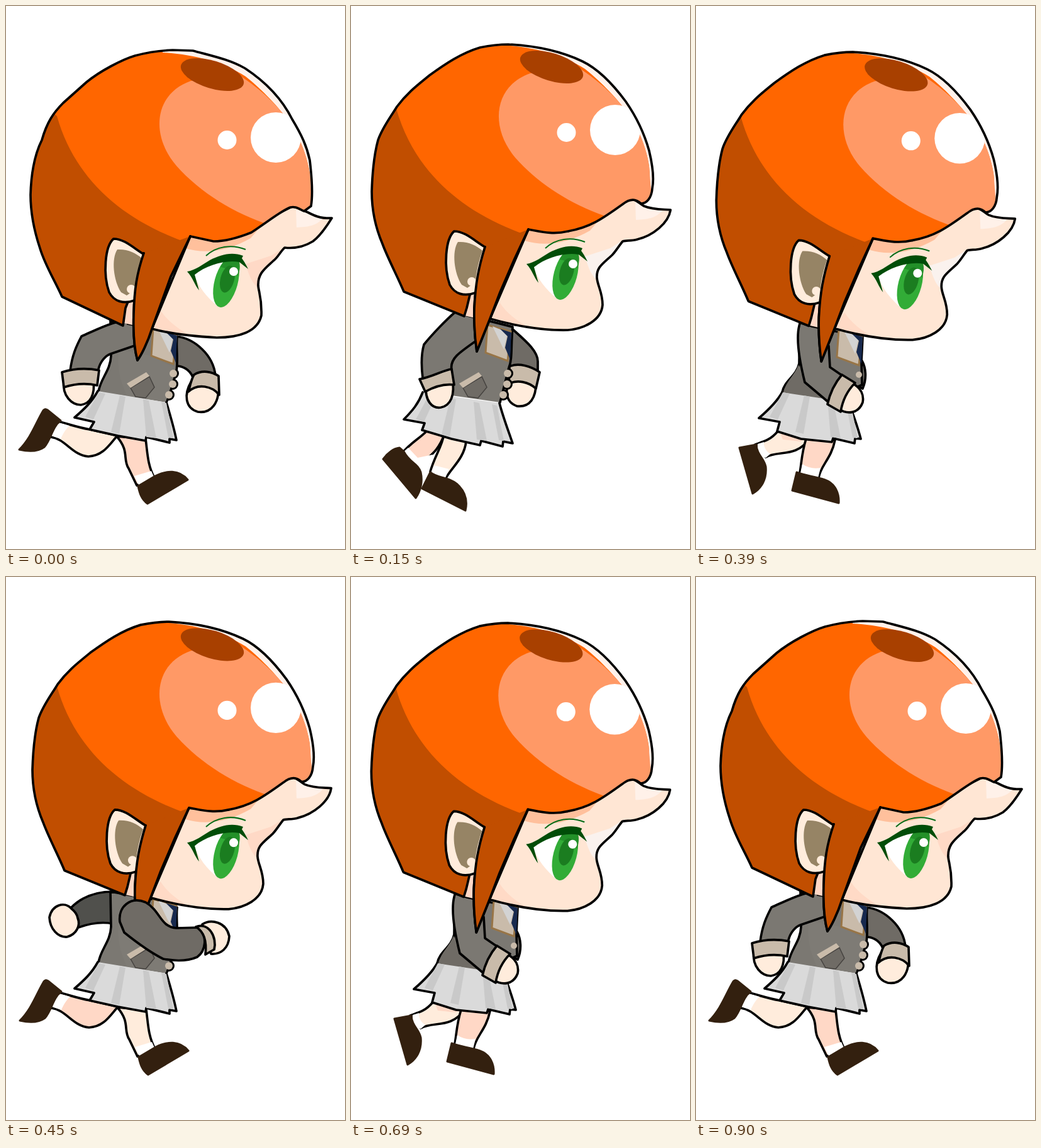
Recreate the animation shown at these times as an HTML page. Size 539x863 px, loop 1050 ms.

```html
<!DOCTYPE html>
<html lang="en">
<head>
<meta charset="utf-8">
<title>Running girl</title>
<style>
html, body { margin: 0; width: 100%; height: 100%; overflow: hidden; background: #fff; }
svg { display: block; width: 100%; height: 100%; }
.ink { stroke: #000; stroke-width: 3.7; stroke-linejoin: round; stroke-linecap: round; }
.line { fill: none; }
.skin { fill: #ffecdc; }
.rose { fill: #ffd8c6; }
.coat { fill: #7b7872; }
.shade { fill: #6f6b65; }
.tan { fill: #c9bbaa; }
.skirt { fill: #dadada; }
.pleat { fill: #c9c9c9; }
.sock { fill: #fff; }
.shoe { fill: #33200f; stroke: #33200f; stroke-width: 3; stroke-linejoin: round; }
.hair { fill: #c14e00; }
.pose { visibility: hidden; animation: 1050ms step-end infinite; }
.stride { animation-name: stride; }
.lift { animation-name: lift; }
.pass { animation-name: pass; }
.reach { animation-name: reach; }
.stride, .reach { --cheek: #ffd9c6; }
.lift, .pass { --cheek: #faf2ee; }
@keyframes stride { 0%, 85.7143% { visibility: visible } 14.2857%, 100% { visibility: hidden } }
@keyframes lift { 0%, 28.5714%, 85.7143%, 100% { visibility: hidden } 14.2857%, 71.4286% { visibility: visible } }
@keyframes pass { 0%, 42.8571%, 71.4286%, 100% { visibility: hidden } 28.5714%, 57.1429% { visibility: visible } }
@keyframes reach { 0%, 57.1429%, 100% { visibility: hidden } 42.8571% { visibility: visible } }
</style>
</head>
<body>
<svg viewBox="0 0 539 863">
<defs>
  <!-- head outlines -->
  <path id="skull" d="M84 454C74 430 58 400 50 378C38 350 33 325 33 295C34 262 37 235 43 213C50 193 62 178 73 160C90 137 108 124 125 110C150 92 175 75 205 66C225 62 240 61 250 61C290 63 330 70 368 88C395 101 417 125 437 152C455 178 467 205 474 230C480 255 482 275 479 290C478 305 470 314 461 314C452 305 442 307 432 315C400 338 380 352 345 358C320 364 300 358 282 355L260 402 237 455 221 497 200 549C198 535 195 515 196 480C198 440 203 415 213 383L190 455 184 480 180 493Z"/>
  <path id="skullRun" d="M89 462C78 437 62 412 54 385C44 355 39 330 39 300C40 265 46 235 57 213C65 185 75 170 91 154L128 121C150 103 185 85 205 79C220 75 240 71 265 70L297 71C330 80 355 85 380 99C415 122 440 150 455 180C470 205 478 222 483 245C486 270 488 300 485 318L474 326C465 322 460 318 452 320C440 324 420 340 390 360C370 368 350 374 330 374L293 366 262 430 232 513C225 535 215 555 209 563C204 545 202 520 203 490C204 450 208 425 219 393L196 465 190 480 186 508Z"/>
  <clipPath id="skullClip"><use href="#skull"/></clipPath>
  <clipPath id="skullRunClip"><use href="#skullRun"/></clipPath>
  <path id="face" d="M221 497C260 508 305 516 345 515C370 513 398 500 400 475C400 455 392 445 391 432C390 415 400 410 415 396C421 390 426 381 432 374C438 372 445 374 455 371C480 365 505 345 508 324C495 323 480 324 466 318C458 314 452 305 443 308L345 358 282 355Z"/>
  <path id="faceRun" d="M232 513C265 522 300 525 335 527C370 527 400 518 406 492C407 465 402 455 401 445C400 425 412 417 425 405C432 400 435 392 443 384C460 386 475 382 488 374C500 365 510 350 518 337C505 338 495 336 480 328C470 324 458 316 452 320L354 370 293 366Z"/>
  <clipPath id="faceClip"><use href="#face"/></clipPath>
  <clipPath id="faceRunClip"><use href="#faceRun"/></clipPath>

  <g id="faceTones">
    <path d="M200 300H520V560H200Z" fill="#ffe6d4"/>
    <path d="M265 350L276 373C308 383 345 377 380 357L420 310Z" fill="#ffc09c"/>
    <path d="M215 500L237 472C250 492 270 505 300 520Z" fill="#ffdac6"/>
    <path d="M372 398L412 385 436 370 425 395 390 434C382 428 377 415 372 398Z" fill="var(--cheek)"/>
    <path d="M452 312L453 340C470 339 485 338 496 324L470 315Z" fill="#fff1e9"/>
  </g>
  <g id="hairTones">
    <path d="M0 0H539V600H0Z" fill="#fff1ea"/>
    <path d="M0 0H240V62C290 65 335 77 372 100C400 122 425 150 440 170C455 190 470 225 474 255C476 275 474 300 470 325L400 600H0Z" fill="#f60"/>
    <path class="hair" d="M72 163C100 262 175 328 279 364L310 420 200 580 0 580V100Z"/>
    <path d="M285 107C225 128 221 195 262 242C300 285 355 318 410 336L480 330 474 255C470 225 455 190 440 170C425 150 400 122 360 97Z" fill="#f96"/>
    <ellipse cx="319" cy="97" rx="52" ry="22" transform="rotate(17 319 97)" fill="#a84000"/>
    <circle cx="420" cy="197" r="40" fill="#fff"/>
    <circle cx="342.500" cy="201" r="15" fill="#fff"/>
  </g>
  <g id="eye">
    <path d="M289 411C305 398 322 391 345 388L326 464C312 452 296 435 289 411Z" fill="#fff"/>
    <ellipse cx="341" cy="427" rx="18.500" ry="41" transform="rotate(15 341 427)" fill="#32ac37"/>
    <path d="M332 403C338 388 352 384 361 392C364 400 363 408 360 417C351 408 342 405 332 403Z" fill="#239029"/>
    <ellipse cx="343" cy="422" rx="11" ry="22" transform="rotate(15 343 422)" fill="#1b7d20"/>
    <path d="M279 410C292 408 303 399 315 392C332 383 350 378 368 385L366 389C371 396 373 400 376 406L362 395C340 391 310 400 291 415L298 440C290 430 289 421 279 410Z" fill="#004d08"/>
    <path d="M309 385C325 370 350 366 372 375" class="line" stroke="#006b16" stroke-width="2"/>
    <circle cx="353" cy="410" r="7" fill="#fff"/>
  </g>
  <g id="ear">
    <path class="ink skin" d="M213 383C197 374 182 358 164 358C150 370 147 415 157 443C165 458 180 462 197 456L204 450Z"/>
    <path d="M170 375C186 374 199 380 209 389C202 409 199 425 198 439L185 448 176 443C164 425 160 390 170 375Z" fill="#968465"/>
    <circle cx="192" cy="438" r="7" class="skin"/>
  </g>
  <path id="neck" class="rose" d="M186 450H215V500L180 492Z"/>
  <g id="head">
    <use href="#neck"/>
    <g clip-path="url(#faceClip)"><use href="#faceTones"/></g>
    <use href="#face" class="ink line"/>
    <use href="#eye"/>
    <g clip-path="url(#skullClip)"><use href="#hairTones"/></g>
    <use href="#skull" class="ink line"/>
    <use href="#ear"/>
    <path class="ink hair" d="M213 383C203 415 198 440 196 480C195 515 198 535 200 549L221 497 237 455 260 402 282 355"/>
  </g>
  <g id="headRun">
    <g clip-path="url(#faceRunClip)"><use href="#faceTones" x="9" y="12"/></g>
    <use href="#neck" x="8" y="12"/>
    <use href="#faceRun" class="ink line"/>
    <use href="#eye" x="9" y="12"/>
    <g clip-path="url(#skullRunClip)"><use href="#hairTones" x="9" y="12"/></g>
    <use href="#skullRun" class="ink line"/>
    <use href="#ear" x="7" y="12"/>
    <path class="ink hair" d="M219 393C208 425 204 450 203 490C202 520 204 545 209 563C215 555 225 535 232 513L262 430 293 366"/>
  </g>

  <!-- uniform details -->
  <g id="buttons" class="tan" stroke-width="6">
    <circle cx="266" cy="584" r="6"/><circle cx="265" cy="601" r="6"/><circle cx="259" cy="618" r="6"/>
  </g>
  <g id="lapel">
    <path d="M234 512L231 556 266 569 271 522Z" class="tan" stroke="#987547" stroke-width="3"/>
    <path d="M242 514L260 551 266 524Z" fill="#d3d3d3"/>
    <path d="M254 518L272 524 270 567 262 548 266 530Z" fill="#17294e"/>
  </g>
  <g id="pocket">
    <path class="shade" d="M198 607L206 621 222 623 236 606 228 589Z" stroke="#45423f" stroke-width="1.500"/>
    <path class="tan" d="M192 600L223 582 228 588 198 607Z"/>
  </g>
  <g id="pleats" class="pleat">
    <path d="M147 614L158 616 139 657 126 653Z"/>
    <path d="M181 619L190 621 180 680 167 677Z"/>
    <path d="M218 625L227 627 239 687 223 685Z"/>
    <path d="M247 629L255 631 266 687 258 686Z"/>
  </g>

  <!-- body shared by both wide strides -->
  <g id="strideLegs">
    <path class="ink" fill="var(--back)" d="M133 673C115 670 98 664 82 660L71 685C95 688 105 714 131 716C155 715 165 696 177 683Z"/>
    <path class="sock" d="M83 662L101 667C95 672 90 681 87 688L72 683Z"/>
    <path class="shoe" d="M59 643Q62 639 66 642L87 659C73 669 72 689 61 701C50 709 34 708 21 705C40 686 47 663 59 643Z"/>
    <path class="ink" fill="var(--front)" d="M176 684C197 708 185 720 195 735L208 762 236 750C225 730 225 710 222 688Z"/>
    <path class="sock" d="M204 747L231 739 236 750 211 761Z"/>
    <path class="shoe" d="M210 763L237 747C255 738 275 736 289 753L225 791C215 784 212 773 210 763Z"/>
  </g>
  <g id="strideTorso">
    <use href="#buttons" stroke="#000"/>
    <path class="ink coat" d="M147 613C150 592 166 580 167 556L166 500 232 512 272 525C270 545 274 560 271 580C266 597 262 615 255 630"/>
    <path d="M179 546C176 575 182 600 193 620L254 629 269 575 230 556Z" fill="#7e7b75"/>
    <use href="#lapel"/><use href="#buttons"/><use href="#pocket"/>
    <path class="ink skirt" d="M146 612C136 630 124 641 109 654L140 661 133 673 178 683 222 691 223 685 260 694 260 688 271 690C267 670 261 650 255 630"/>
    <use href="#pleats"/>
  </g>
</defs>

<g class="pose stride">
  <use href="#strideLegs" style="--back:#ffecdc;--front:#ffd8c6"/>
  <path class="ink shade" d="M270 525C300 528 330 555 333 588L297 590C292 577 280 572 270 572Z"/>
  <path class="ink skin" d="M295 596C282 618 285 639 305 645C325 648 342 632 337 596Z"/>
  <path class="ink tan" d="M290 613C293 602 295 592 299 586C312 578 327 581 338 588L339 618C328 604 305 599 290 613Z"/>
  <use href="#strideTorso"/>
  <path class="coat" d="M190 500C165 503 145 514 120 525C112 540 105 555 102 580L147 577C150 565 158 556 166 553L205 540Z"/>
  <path class="ink line" d="M190 500C165 503 145 514 120 525C112 540 105 555 102 580M147 577C150 565 158 556 166 553L204 540"/>
  <path class="ink skin" d="M92 596C89 620 105 634 119 634C134 632 142 618 139 594Z"/>
  <path class="ink tan" d="M89 582C108 576 128 575 148 579L145 603C128 599 110 600 92 606Z"/>
  <use href="#headRun"/>
</g>

<g class="pose lift">
  <path class="ink rose" d="M120 676C108 688 94 695 82 710L108 735C116 718 136 715 148 682Z"/>
  <path class="sock" d="M91 702L106 718 130 713 117 750 105 745 82 710Z"/>
  <path class="shoe" d="M51 720C58 710 68 703 77 702L84 708C94 727 106 726 111 741C114 755 111 770 103 782Z"/>
  <path class="ink skin" d="M148 680C145 700 133 715 126 740L150 752C158 735 180 720 183 692Z"/>
  <path class="sock" d="M132 730L156 736 149 752 127 742Z"/>
  <path class="shoe" d="M113 767L126 741C140 752 153 747 169 760C181 771 186 785 182 802Z"/>
  <path class="ink shade" d="M255 512C275 530 298 548 297 566V582L252 576Z"/>
  <path class="ink skin" d="M256 586C242 610 246 630 264 636C283 638 296 625 294 592Z"/>
  <path class="ink tan" d="M252 573C266 566 287 573 300 582L294 608C282 597 265 594 251 600Z"/>
  <use href="#buttons" x="-17" stroke="#000"/>
  <path class="ink coat" d="M118 613L164 560 165 487 257 510C254 540 257 560 251 575L237 630"/>
  <use href="#lapel" x="-17" y="-5"/>
  <use href="#buttons" x="-17"/>
  <use href="#pocket" x="-20"/>
  <path class="ink skirt" d="M114 614C107 632 98 643 84 657L117 663 113 674 160 688 205 698 207 691 241 700 242 692 257 695C249 672 241 651 236 631"/>
  <use href="#pleats" transform="translate(-23 4)"/>
  <path class="coat" d="M165 487C150 500 128 523 116 538C111 555 112 575 114 591L160 578C157 561 170 552 203 530Z"/>
  <path class="ink line" d="M165 487C150 500 128 523 116 538C111 555 112 575 114 591M160 578C157 561 170 552 202 530"/>
  <path class="ink skin" d="M119 600C117 630 130 640 143 638C158 635 166 620 161 590Z"/>
  <path class="ink tan" d="M109 593C128 590 146 579 160 577L164 602C148 600 132 605 118 613Z"/>
  <use href="#head"/>
</g>

<g class="pose pass">
  <path class="ink skin" d="M130 676C118 690 108 692 94 697L111 717C130 706 160 718 180 688Z"/>
  <path class="rose" d="M134 679L175 688 166 692 138 689Z"/>
  <path class="sock" d="M98 696L108 693C107 700 111 707 118 712L111 718 98 715Z"/>
  <path class="shoe" d="M69 702L96 697C97 714 108 718 111 732C113 752 104 767 90 775Z"/>
  <path class="ink rose" d="M175 688C168 710 168 725 165 742L195 750C198 730 215 720 221 690Z"/>
  <path class="sock" d="M169 728C178 734 188 736 198 734L194 750 166 742Z"/>
  <path class="shoe" d="M153 770L160 741C174 747 188 747 205 753C222 759 228 775 227 790Z"/>
  <path class="ink shade" d="M264 564C270 575 272 592 265 608L250 600Z"/>
  <path class="ink coat" d="M137 614C140 596 160 588 164 568L165 505 265 526 263 565 264 602 213 625"/>
  <path class="shade" d="M163 570L172 600 211 632 139 614C143 596 157 587 163 570Z"/>
  <use href="#lapel" x="-7" y="2"/>
  <circle class="tan" cx="259" cy="586" r="5"/>
  <path class="ink skirt" d="M137 614C128 630 114 643 100 655L133 661 129 676 167 688 216 693 218 687 252 695 253 687 262 688C257 668 250 650 243 630"/>
  <use href="#pleats" transform="translate(-9 0)"/>
  <path class="coat" d="M165 505C160 520 161 550 173 598L211 630 232 587 213 574 211 520Z"/>
  <path class="ink line" d="M165 505C160 520 161 550 173 598L211 630M232 587L213 574 211 540"/>
  <path class="ink skin" d="M246 598C264 607 267 620 265 630C259 646 243 651 226 640Z"/>
  <path class="ink tan" d="M232 586L253 599C240 612 233 626 230 645L209 633C213 615 220 600 232 586Z"/>
  <use href="#head" transform="matrix(1 0 0 1.0076 -.7 11.7)"/>
</g>

<g class="pose reach">
  <use href="#strideLegs" x="1" style="--back:#ffd8c6;--front:#ffecdc"/>
  <path class="ink" fill="#50504c" d="M170 500C145 500 120 508 102 527L115 557C132 551 150 547 170 551Z"/>
  <path class="ink skin" d="M104 527C93 515 73 521 69 541C70 560 83 573 97 572C112 568 119 554 114 542C113 535 109 531 104 527Z"/>
  <use href="#strideTorso"/>
  <use href="#head" transform="matrix(1 0 0 1.006 9 9.700)"/>
  <path class="ink shade" d="M181 548C178 524 198 507 222 517C246 531 245 556 271 558L308 557C320 571 318 594 304 604C288 611 266 610 250 607C228 596 198 573 188 565Z"/>
  <path class="ink skin" d="M312 552C326 543 350 548 355 571C354 590 342 600 326 599Z"/>
  <path class="ink tan" d="M302 556C322 548 336 572 331 592L317 600C319 583 317 565 302 556Z"/>
</g>
</svg>
</body>
</html>
```
